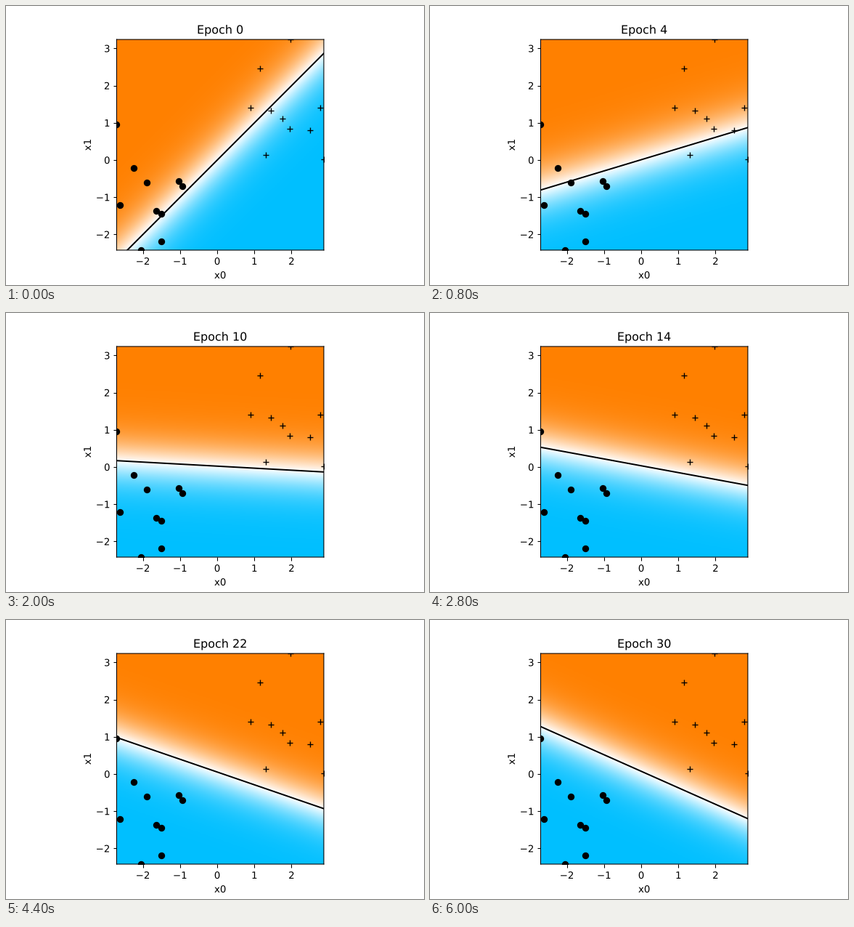
A matplotlib script that plays this animation: 576 px wide and 384 px high, repeating every 6.2 s.

```python
import numpy as np
import matplotlib.pyplot as plt
from matplotlib.animation import FuncAnimation
from matplotlib.colors import LinearSegmentedColormap
from matplotlib.patheffects import Normal

EPOCHS = 31
STEP_MS = 200

# Unsnapped outlines, with text drawn as paths, give a vector look
plt.rcParams.update({
    "font.family": "DejaVu Sans",
    "path.snap": False,
    "path.effects": [Normal()],
    "xtick.major.pad": 4,
    "ytick.major.pad": 3.2,
})

# Two Gaussian clouds, one unit either side of the origin
noise = np.random.RandomState(0).randn(30, 2)
plus, dots = noise[:10] + 1, noise[20:] - 1
points = np.vstack([plus, dots])
(x_min, y_min), (x_max, y_max) = points.min(axis=0), points.max(axis=0)

# The boundary turns roughly with the logarithm of the epoch
knot_epochs = np.array([0, 1, 2, 6, 10, 14, 22, 30])
knot_slopes = [1, 0.747, 0.553, 0.144, -0.054, -0.184, -0.343, -0.444]
slope_fit = np.polyfit(np.log(knot_epochs + 3), knot_slopes, 6)


def boundary(epoch):
    """Slope, intercept and steepness of the classifier."""
    slope = np.polyval(slope_fit, np.log(epoch + 3))
    offset = 0.0025 * epoch
    steepness = 2.15 + 0.55 * (1 - np.exp(-epoch / 4))
    return slope, offset, steepness


def probability(epoch):
    slope, offset, steepness = boundary(epoch)
    return 1 / (1 + np.exp(-steepness * (gy - slope * gx - offset)))


gx, gy = np.meshgrid(np.linspace(x_min, x_max, 300),
                     np.linspace(y_min, y_max, 300))
cmap = LinearSegmentedColormap.from_list(
    "sides", ["#00bfff", "white", "#ff8000"], N=512)

fig = plt.figure(figsize=(6, 4), dpi=96, facecolor="white")
fig.subplots_adjust(left=0.125, right=0.9, bottom=0.125, top=0.88)
ax = fig.add_subplot()
field = ax.imshow(probability(0), origin="lower", cmap=cmap, vmin=0, vmax=1,
                  extent=(x_min, x_max, y_min, y_max),
                  interpolation="bilinear")
for cloud, marker in ((plus, "+"), (dots, "o")):
    ax.scatter(*cloud.T, s=36, c="black", marker=marker, linewidths=1)
line, = ax.plot([], [], "k-", lw=1.5)
ax.set(xlim=(x_min, x_max), ylim=(y_min, y_max),
       xticks=range(-2, 3), yticks=range(-2, 4))
ax.set_xlabel("x0", labelpad=4.5)
ax.set_ylabel("x1", labelpad=2.8)
title = ax.set_title("Epoch 0")


def draw(epoch):
    slope, offset, _ = boundary(epoch)
    ends = np.array([x_min, x_max])
    field.set_data(probability(epoch))
    line.set_data(ends, slope * ends + offset)
    title.set_text(f"Epoch {epoch}")
    return field, line, title


anim = FuncAnimation(fig, draw, frames=EPOCHS, interval=STEP_MS,
                     repeat=True, repeat_delay=0)
plt.show()
```
